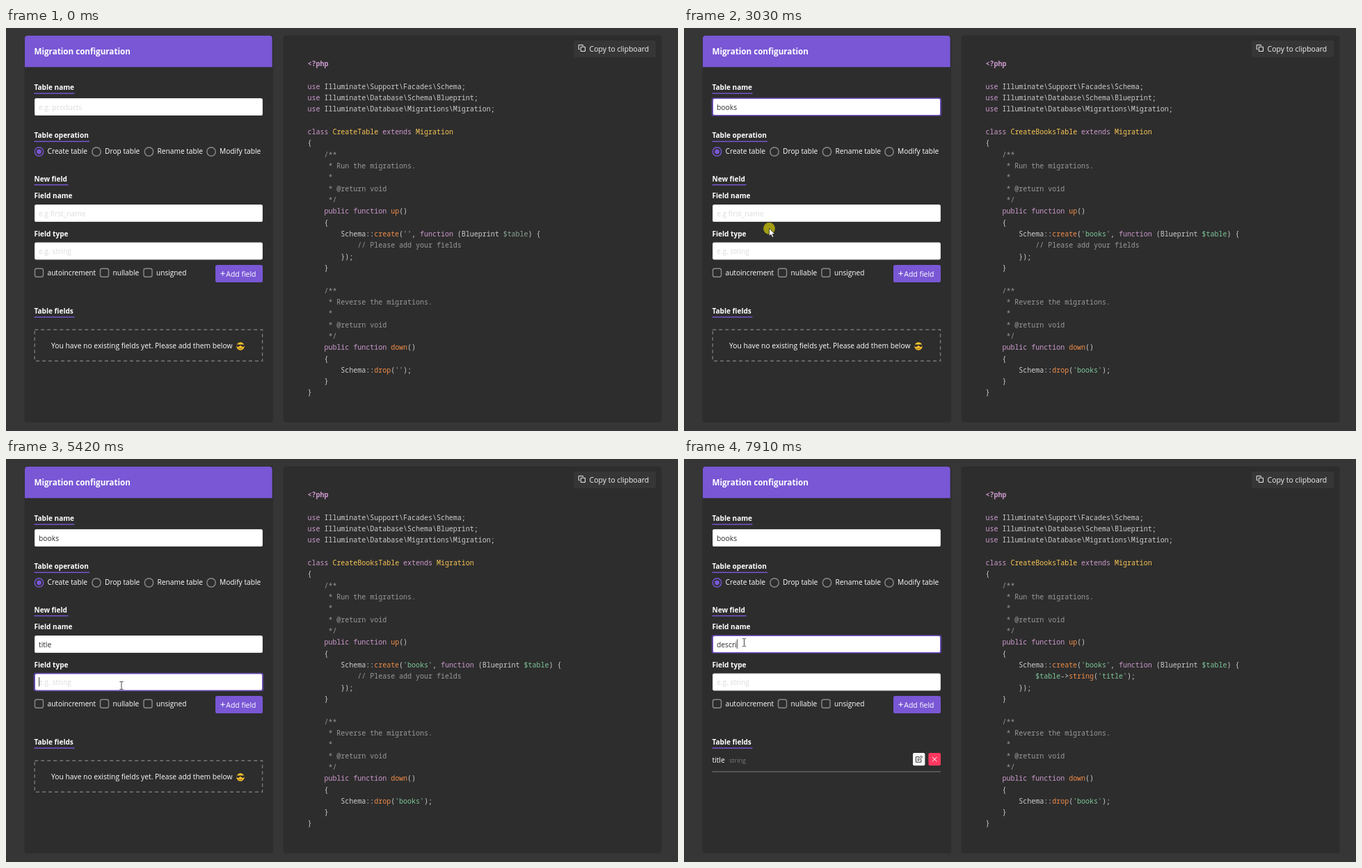
Animation, 966 px wide and 580 px high, one loop 8000 ms. Source, as an HTML page:

```html
<!DOCTYPE html>
<html lang="en">
<head>
<meta charset="utf-8">
<title>Migration generator</title>
<style>
  html, body { margin: 0; width: 100%; height: 100%; overflow: hidden; background: #363636; }
  svg { display: block; width: 966px; height: 580px; }
  text { font-family: "Open Sans", "Noto Sans", sans-serif; white-space: pre; }
  .code text { font: 9.97px "Noto Sans Mono", "DejaVu Sans Mono", monospace; fill: #ccc; }
  .beam { mix-blend-mode: difference; }
</style>
</head>
<body>
<svg id="stage" viewBox="0 0 966 580"></svg>
<script>
const LOOP = 8000;
const PURPLE = '#7957d5';
const UI_SIZE = 10.3;
const stage = document.getElementById('stage');
const ruler = document.createElement('canvas').getContext('2d');

// Step tables: [start time, value...]; each value holds until the next entry.
const tableName = [[0, ''], [1160, 'b'], [1410, 'bo'], [1560, 'boo'], [1710, 'book'], [1800, 'books']];
const fieldName = [[0, ''], [3960, 't'], [4190, 'ti'], [4270, 'tit'], [4420, 'titl'], [4500, 'title'],
  [6430, ''], [7210, 'd'], [7360, 'de'], [7530, 'des'], [7680, 'desc'], [7840, 'descr'], [7910, 'descri']];
const fieldType = [[0, ''], [5490, 's'], [6120, 'string'], [6430, '']];
const focus = [[0, ''], [710, 'table'], [3120, ''], [3500, 'name'], [5340, 'type'],
  [5890, ''], [6350, 'button'], [6980, 'name']];
const caret = [[0, 0], [710, 1], [2180, 0], [3500, 1], [4880, 0], [5340, 1], [5890, 0], [6980, 1]];
const menu = [[0, 0], [5490, 1], [6120, 0]];
const added = [[0, 0], [6430, 1]];
const pointer = [
  [0, ''], [150, 'arrow', 378, 350], [230, 'arrow', 310, 280], [310, 'arrow', 200, 190],
  [380, 'arrow', 112, 136], [460, 'beam', 73.5, 117], [630, 'beam', 73.5, 117, 1], [710, 'beam', 73.5, 117],
  [2180, 'beam', 58, 119], [2260, 'arrow', 32, 138], [2330, 'arrow', 14, 166], [2410, 'arrow', 8, 194],
  [2490, 'arrow', 12, 219], [2570, 'arrow', 28, 242], [2640, 'beam', 60, 261], [2720, 'beam', 88, 272],
  [2800, 'arrow', 110, 284], [2870, 'arrow', 120, 291], [2950, 'arrow', 122.5, 288.5],
  [3030, 'arrow', 122.5, 288.5, 1], [3120, 'arrow', 122.5, 288.5], [3270, 'arrow', 127, 282],
  [3350, 'beam', 133, 276], [3420, 'beam', 136.5, 273, 1], [3500, 'beam', 136.5, 273], [3730, ''],
  [4880, 'beam', 180.5, 279.5], [4960, 'arrow', 180, 308], [5040, 'arrow', 173, 338],
  [5190, 'beam', 166, 326], [5270, 'beam', 166, 326, 1], [5340, 'beam', 166, 326], [5490, ''],
  [5640, 'beam', 158, 331], [5720, 'hand', 147, 350], [5890, 'hand', 139, 358],
  [5960, 'hand', 138, 358, 1], [6040, 'hand', 138, 358], [6120, 'arrow', 200, 356],
  [6200, 'arrow', 280, 355], [6280, 'hand', 328, 354], [6350, 'hand', 328, 354, 1],
  [6430, 'hand', 328, 354], [6510, 'arrow', 290, 348], [6600, 'arrow', 227, 335],
  [6670, 'arrow', 170, 311], [6750, 'arrow', 128, 289], [6830, 'beam', 100, 271],
  [6910, 'beam', 86.5, 264, 1], [6980, 'beam', 86.5, 264]
];

const at = (steps, t) => steps.findLast(step => step[0] <= t).slice(1);
const value = (steps, t) => at(steps, t)[0];

const text = (x, y, s, { size = UI_SIZE, fill = '#fff', weight = 400 } = {}) =>
  `<text x="${x}" y="${y}" font-size="${size}" fill="${fill}" font-weight="${weight}">${s}</text>`;
const rect = (x, y, w, h, fill, r = 0, extra = '') =>
  `<rect x="${x}" y="${y}" width="${w}" height="${h}" rx="${r}" fill="${fill}" ${extra}/>`;
const path = (d, stroke, width = 1, fill = 'none') =>
  `<path d="${d}" stroke="${stroke}" stroke-width="${width}" fill="${fill}"/>`;
const bold = (x, y, s, size = 10.05) => text(x, y, s, { size, weight: 700 });
const heading = (y, s, width) => bold(40.5, y, s) + rect(40.5, y + 4.2, width, 1.4, PURPLE);

function panel(x, w) {
  return rect(x - .7, 10.6, w + 1.4, 557.4, '#0a0a0a', 4, 'opacity=".12"') + rect(x, 11, w, 556, '#2d2d2d', 4);
}

function radio(x, label, on) {
  const dot = on ? `<circle cx="${x}" cy="178" r="3.4" fill="${PURPLE}"/>` : '';
  return `<circle cx="${x}" cy="178" r="6.2" fill="none" stroke="${on ? PURPLE : '#8a8a8a'}" stroke-width="1.4"/>` +
    dot + text(x + 12, 181.4, label, { size: 10.2 });
}

function checkbox(x, label) {
  return rect(x, 346.2, 12, 12, 'none', 2.4, 'stroke="#8a8a8a" stroke-width="1.4"') +
    text(x + 18, 356.2, label, { size: 10.15 });
}

function input(y, content, placeholder, focused, showCaret) {
  let out = focused ? rect(39.4, y - 1, 331.2, 27, PURPLE, 3.5, 'opacity=".4"') : '';
  out += rect(41, y, 328, 25, focused ? PURPLE : '#e6e6e6', 2.6) + rect(42, y + 1, 326, 23, '#fff', 1.8);
  out += content ? text(47, y + 16.8, content, { fill: '#2b2b2b' })
                 : text(47, y + 16.8, placeholder, { fill: '#dcdcdc' });
  if (focused && showCaret) {
    ruler.font = `${UI_SIZE}px "Open Sans", "Noto Sans", sans-serif`;
    out += rect(47.2 + ruler.measureText(content).width, y + 5.5, .9, 13.5, '#333');
  }
  return out;
}

function addButton(focused) {
  return (focused ? rect(299.8, 340, 70.4, 27, PURPLE, 4, 'opacity=".45"') : '') +
    rect(301, 341, 68, 25, focused ? '#704cd2' : PURPLE, 2.6) +
    path('M308.4 353.3h6.4M311.6 350.1v6.4', '#fff', 1) + text(316.3, 358.2, 'Add field', { size: 10.45 });
}

function emptyList() {
  return rect(41.2, 434.3, 327.4, 45, 'none', 0, 'stroke="#777" stroke-width="1.4" stroke-dasharray="5 4"') +
    text(65, 461.4, 'You have no existing fields yet. Please add them below') +
    '<circle cx="337" cy="458" r="5.7" fill="#fcc32c"/>' +
    path('M331 455.6h12l-.5 2.4q-2.6 2.2-4.7-.8h-1.6q-2.1 3-4.7.8z', 'none', 0, '#2b2b2b') +
    path('M334.2 460.6q2.8 2 5.6 0', '#7a4a12', .9);
}

function fieldRow() {
  return text(40.5, 436.6, 'title') + text(65, 436.6, 'string', { size: 9, fill: '#7a7a7a' }) +
    rect(329, 423, 17.4, 18.3, '#f5f5f5', 2) + rect(351.4, 423, 17.6, 18.3, '#ff3860', 2) +
    path('M338 428.7h-4.6v7.6h7.4v-4M336 433.8l.5-2.1 4.6-4.4 1.5 1.5-4.5 4.5z', '#363636') +
    path('M357 429l6.4 6.4M363.4 429l-6.4 6.4', '#fff', 1) +
    rect(40.5, 449.4, 328.5, 1.3, '#6c6c6c');
}

function dropdown() {
  const items = ['string', 'bigIncrements', 'increments', 'ipAddress', 'json', 'jsonb'];
  return rect(40, 336, 330, 137.5, '#0a0a0a', 3, 'opacity=".2"') + rect(41, 336, 328, 136, '#fff', 2.5) +
    rect(41, 342, 317, 22, '#f5f5f5') + rect(358, 336.5, 11, 135, '#f1f1f1') +
    rect(358.6, 347, 9.8, 19.5, '#c1c1c1') +
    path('M361 343.4l2.4-2.4 2.4 2.4M361 465l2.4 2.4 2.4-2.4', '#505050', 1.2) +
    items.map((item, i) => text(51.5, 356.3 + i * 22.4, item, { size: 8.85, fill: '#4a4a4a' })).join('');
}

function source(name, hasField) {
  const title = name && name[0].toUpperCase() + name.slice(1);
  const doc = label => ['    /**', `     * ${label} the migrations.`, '     *', '     * @return void', '     */'];
  return ['<?php', '',
    'use Illuminate\\Support\\Facades\\Schema;',
    'use Illuminate\\Database\\Schema\\Blueprint;',
    'use Illuminate\\Database\\Migrations\\Migration;', '',
    `class Create${title}Table extends Migration`, '{',
    ...doc('Run'), '    public function up()', '    {',
    `        Schema::create('${name}', function (Blueprint $table) {`,
    hasField ? "            $table->string('title');" : '            // Please add your fields',
    '        });', '    }', '',
    ...doc('Reverse'), '    public function down()', '    {',
    `        Schema::drop('${name}');`, '    }', '}'];
}

const escape = s => s.replace(/&/g, '&amp;').replace(/</g, '&lt;').replace(/>/g, '&gt;');
const token = /('[^']*'|\$\w+|<\?php|\b(?:use|class|extends|public|function)\b|\bCreate\w*Table\b|(?<=extends )Migration|\b(?:up|down|create|drop|string)(?=\())/;

function tokenColor(s, variable) {
  if (s[0] === "'") return '#7ec699';
  if (s[0] === '$') return variable;
  if (/^(Create|Migration)/.test(s)) return '#f8c555';
  if (/^(up|down|create|drop|string)$/.test(s)) return '#f08d49';
  return '#cc99cd';
}

function highlight(line, variable) {
  if (/^\s*(\/|\*)/.test(line)) return `<tspan fill="#999">${line}</tspan>`;
  return line.split(token).map((part, i) => {
    if (i % 2 === 0) return escape(part);
    const weight = part === '<?php' ? ' font-weight="700"' : '';
    return `<tspan fill="${tokenColor(part, variable)}"${weight}>${escape(part)}</tspan>`;
  }).join('');
}

function codeView(name, hasField) {
  const variable = name ? '#7ec699' : '#86a394';
  const lines = source(name, hasField).map((line, i) =>
    `<text x="433.5" y="${(55.2 + i * 16.32).toFixed(2)}">${highlight(line, variable)}</text>`);
  return `<g class="code">${lines.join('')}</g>`;
}

const shapes = {
  arrow: path('M0 0V11L2.6 8.7 4.4 12.7 6.3 11.9 4.6 8H8Z', '#222', .7, '#fff'),
  beam: path('M-2.6-5.6H-.8L0-5 .8-5.6H2.6M0-5V5M-2.6 5.6H-.8L0 5 .8 5.6H2.6', '#d0d0d0', .9),
  hand: path('M-.2 1.2q1.2-1.2 2 .2v4.3q1.3-.7 1.8.5 1.4-.5 1.8.7 1.5-.3 1.7 1v3.4q-.4 1.6-1.1 2.4v2H-.4v-1.6' +
    'q-2.2-2.4-3.8-5.6.6-1.6 2.4-.2l1.6 1.8z', '#222', .9, '#fff')
};

function cursor([kind, x, y, pressed]) {
  if (!kind) return '';
  const ring = pressed ? `<circle cx="${x}" cy="${y}" r="8.4" fill="#f8f000" opacity=".58"/>` : '';
  return ring + `<g transform="translate(${x} ${y})" class="${kind}">${shapes[kind]}</g>`;
}

const backdrop = panel(27, 356.6) + panel(399, 543) +
  path('M27 56.3V15q0-4 4-4h347.7q4 0 4 4v41.3z', 'none', 0, PURPLE) +
  bold(40.5, 38, 'Migration configuration', 11.65) +
  heading(89.2, 'Table name', 58) + heading(158.4, 'Table operation', 79.5) + heading(220.8, 'New field', 49) +
  bold(40.5, 245.2, 'Field name') + bold(40.5, 299.8, 'Field type') + heading(411.2, 'Table fields', 58) +
  radio(47.5, 'Create table', true) + radio(130, 'Drop table') + radio(205.5, 'Rename table') + radio(295, 'Modify table') +
  checkbox(41.5, 'autoincrement') + checkbox(135.5, 'nullable') + checkbox(198, 'unsigned') +
  rect(816, 18, 118, 24, '#363636', 2.6) +
  path('M826.3 27.2h6.2v6.3h-6.2zM824.8 30.6h-1.6v-6.2h6.2v1.6', '#f0f0f0', 1) +
  text(838.6, 34, 'Copy to clipboard', { size: 10.47, fill: '#f5f5f5' });

function scene(t) {
  const active = value(focus, t), blink = value(caret, t), hasField = value(added, t);
  return backdrop +
    input(101, value(tableName, t), 'e.g. products', active === 'table', blink) +
    input(254, value(fieldName, t), 'e.g first_name', active === 'name', blink) +
    input(308.4, value(fieldType, t), 'e.g. string', active === 'type', blink) +
    addButton(active === 'button') +
    (hasField ? fieldRow() : emptyList()) +
    codeView(value(tableName, t), hasField) +
    (value(menu, t) ? dropdown() : '') +
    cursor(at(pointer, t));
}

let shown = '';
const start = performance.now();
function tick() {
  const markup = scene((performance.now() - start) % LOOP);
  if (markup !== shown) stage.innerHTML = shown = markup;
  requestAnimationFrame(tick);
}
tick();
</script>
</body>
</html>
```
